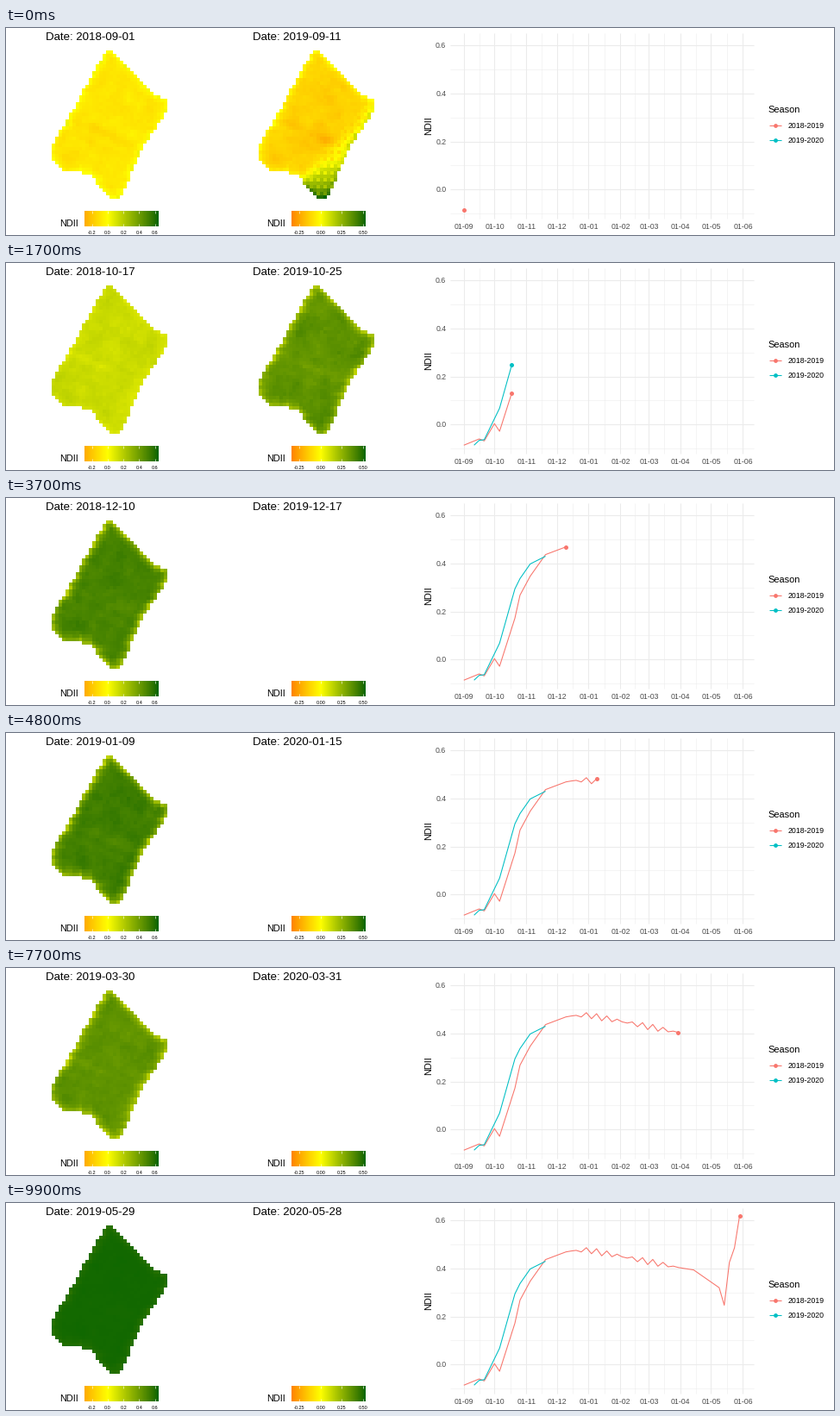
Write a matplotlib script that moves like this. It is 960 px wide and 240 px high and loops after 10000 ms.

```python
import numpy as np
import matplotlib.pyplot as plt
from matplotlib.animation import FuncAnimation
from matplotlib.colors import ListedColormap
from matplotlib.path import Path

W, H, DPI = 960, 240, 72
FRAMES, INTERVAL = 100, 100
RED, TEAL, GREY = "#F8766D", "#00BFC4", "#4D4D4D"
ROWS, COLS = 43, 34
LEFT, RIGHT, TOP, BOTTOM = 53, 187, 26, 198

plt.rcParams["font.family"] = "Liberation Sans"
rng = np.random.default_rng(11)


# ---------- seasonal curves ----------
def plateau_season():
    """Steep rise, wavering plateau every five days, dip and late jump."""
    keys = [(0, -.086), (15, -.06), (20, -.068), (30, .004), (35, -.028),
            (50, .172), (55, .268), (65, .347), (80, .437), (100, .469),
            (120, .477), (155, .45), (210, .404), (225, .394), (250, .32),
            (255, .247), (260, .425), (265, .486), (270, .619)]
    key_days, key_vals = np.array(keys).T
    days = np.union1d(key_days, np.arange(105, 210, 5))
    waver = .013 * np.sin(np.pi * (days - 107) / 50) * np.cos(np.pi * days / 5)
    waver[(days <= 100) | (days >= 210)] = 0
    return days, np.interp(days, key_days, key_vals) + waver


def short_season():
    return np.array([(10, -.086), (15, -.066), (20, -.063), (35, .068),
                     (50, .294), (55, .337), (65, .398), (80, .43)]).T


class Series:
    """Dated values; each date snaps to the nearest animation step."""

    def __init__(self, curve, start, span):
        self.days, self.values = curve
        self.steps = np.round((self.days - start) * (FRAMES - 1) / span)

    def alive(self, i):
        return self.steps[0] <= i <= self.steps[-1]

    def at(self, i):
        return (np.interp(i, self.steps, self.days),
                np.interp(i, self.steps, self.values))


# ---------- diverging colour ramp, blended in CIE Lab ----------
M = np.array([[.4124, .3576, .1805], [.2126, .7152, .0722],
              [.0193, .1192, .9505]])
WHITE = M.sum(axis=1)


def to_lab(rgb):
    c = np.array(rgb, float)
    lin = np.where(c <= .04045, c / 12.92, ((c + .055) / 1.055) ** 2.4)
    t = M @ lin / WHITE
    x, y, z = np.where(t > .008856, np.cbrt(t), 7.787 * t + 16 / 116)
    return np.array([116 * y - 16, 500 * (x - y), 200 * (y - z)])


def to_rgb(lab):
    y = (lab[:, 0] + 16) / 116
    f = np.stack([y + lab[:, 1] / 500, y, y - lab[:, 2] / 200], axis=1)
    xyz = np.where(f > .2069, f ** 3, (f - 16 / 116) / 7.787) * WHITE
    lin = np.clip(xyz @ np.linalg.inv(M).T, 0, 1)
    return np.clip(np.where(lin <= .0031308, 12.92 * lin,
                            1.055 * lin ** (1 / 2.4) - .055), 0, 1)


def ramp(n=256):
    low, mid, high = map(to_lab, [(1, 0, 0), (1, 1, 0), (0, 100 / 255, 0)])
    t = np.linspace(0, 1, n)[:, None]
    lab = np.vstack([low + (mid - low) * t, mid + (high - mid) * t])
    return ListedColormap(to_rgb(lab))


CMAP = ramp()


# ---------- field geometry and textures ----------
def neighbours(a):
    p = np.pad(a, 1, mode="edge")
    return p[:-2, 1:-1], p[2:, 1:-1], p[1:-1, :-2], p[1:-1, 2:]


def noise(passes):
    n = rng.standard_normal((ROWS, COLS))
    for _ in range(passes):
        n = (sum(neighbours(n)) + 2 * n) / 6
    return n / n.std()


def texture():
    return .8 * noise(4) + .35 * noise(0)


def bell(x, width):
    return np.exp(-(x / width) ** 2)


def rim_weight(mask):
    """Strong in the border cells, fading with each ring inwards."""
    m, depth = np.pad(mask, 1), 0
    for _ in range(4):
        depth = depth + m
        m = m & np.logical_and.reduce(neighbours(m))
    depth = depth[1:-1, 1:-1]
    rim = .9 * .42 ** (depth - 1.) * (1 + .22 * noise(2))
    return np.clip(rim, 0, 1.2) - rim[mask].mean()


gx = LEFT + (np.arange(COLS) + .5) * (RIGHT - LEFT) / COLS
gy = TOP + (np.arange(ROWS) + .5) * (BOTTOM - TOP) / ROWS
X, Y = np.meshgrid(gx, gy)
outline = Path([(117, 25), (121, 25.5), (175, 79), (188, 82), (188, 94),
                (162, 133), (148, 161), (132.5, 199), (123.5, 199),
                (96, 169), (66, 164.5), (52, 151), (52, 139)])
inside = outline.contains_points(np.c_[X.ravel(), Y.ravel()]).reshape(X.shape)

rim = rim_weight(inside)
tilt = Y - 105 - .42 * (X - 75)
ridge = (bell(tilt, 5) + .5 * bell(tilt - 17, 4)) * bell(X - 108, 48)
core = bell(X - 117, 14) * bell(Y - 122, 32)

# Freshly wet corner with a checked texture
reach = np.clip((Y - 170 + 1.09 * (X - 100)) / 22, 0, 1)
low = np.clip((Y - 148) / 50, 0, 1)
row, col = np.indices(X.shape)
check = np.where((row % 2 == 0) | (col % 2 == 0), .3, -1)
wet = ((.1 + .07 * check + .45 * low ** 1.3) * reach
       - .08 * bell(X - 130, 12) * bell(Y - 130, 8))
wet -= wet[inside].mean()


class Field:
    def __init__(self, ax, dx, start, span, series, lo, hi, ticks, wetness=0):
        self.start, self.span = np.datetime64(start), span
        self.series, self.lo, self.hi = series, lo, hi
        self.wetness = wetness
        self.tex = texture(), texture()
        lim = max(-lo, hi)
        style = dict(cmap=CMAP, vmin=-lim, vmax=lim, aspect="auto",
                     interpolation="nearest", zorder=2)
        self.img = ax.imshow(np.ma.masked_all(X.shape),
                             extent=(LEFT + dx, RIGHT + dx, BOTTOM, TOP), **style)
        self.title = ax.text(45.9 + dx, 13.8, "", size=13.2)

        x0, x1, y0, y1 = 91 + dx, 177 + dx, 212, 230
        ax.imshow(np.linspace(lo, hi, 300)[None], extent=(x0, x1, y1, y0), **style)
        ax.text(62.3 + dx, 230, "NDII", size=11)
        for label in ticks:
            x = x0 + (float(label) - lo) / (hi - lo) * (x1 - x0)
            ax.vlines([x, x], [y0, y1 - 3.4], [y0 + 3.4, y1], colors="white",
                      lw=.6, zorder=3)
            ax.text(x, 239, label, size=5.5, ha="center")

    def values(self, i):
        day, mean = self.series.at(i)
        phase = day / 25
        tex = np.cos(phase) * self.tex[0] + np.sin(phase) * self.tex[1]
        calm = np.interp(day, [255, 270], [1, .1])
        v = mean + calm * (.016 * tex - .03 * ridge + .008)
        v = v + calm * rim * (.05 - .68 * mean)
        v = v - .06 * core * bell(day - 32, 12)
        v = v + self.wetness * wet * np.exp((10 - day) / 16)
        return np.clip(v, self.lo, self.hi)

    def update(self, i):
        day = i * self.span // (FRAMES - 1)
        self.title.set_text(f"Date: {self.start + day}")
        hidden = ~inside if self.series.alive(i) else np.ones_like(inside)
        self.img.set_data(np.ma.array(self.values(i), mask=hidden))


# ---------- chart ----------
def px(day):
    return 530.8 + 1.1842 * np.asarray(day)


def py(v):
    return 187.3 - 278.5 * np.asarray(v)


def draw_chart(ax):
    x0, x1, y0, y1 = 515, 866.7, 5.5, 221
    months = np.arange("2018-09", "2019-07", dtype="datetime64[M]")
    firsts = months.astype("datetime64[D]")
    days = (firsts - firsts[0]).astype(int)
    levels = np.arange(0, .7, .2)
    grid = dict(colors="#EBEBEB", zorder=1)
    ax.vlines(px((days[1:] + days[:-1]) / 2), y0, y1, lw=.53, **grid)
    ax.hlines(py(levels - .1), x0, x1, lw=.53, **grid)
    ax.vlines(px(days), y0, y1, lw=1.07, **grid)
    ax.hlines(py(levels), x0, x1, lw=1.07, **grid)
    for month, day in zip(months, days):
        ax.text(px(day) + .4, 233, f"01-{str(month)[-2:]}", size=8.8,
                ha="center", color=GREY)
    for v in levels:
        ax.text(510.3, py(v) + 3.1, f"{v:.1f}", size=8.8, ha="right", color=GREY)
    ax.text(490, 113.5, "NDII", size=11, rotation=90, ha="center", va="center")

    ax.text(883, 98, "Season", size=11)
    for y, name, color in ((112.8, "2018-2019", RED), (129.8, "2019-2020", TEAL)):
        ax.plot([885, 899.4], [y, y], color=color, lw=1.07, solid_capstyle="butt")
        ax.plot(892.3, y, "o", color=color, ms=4.8, mew=0)
        ax.text(906.3, y + 3.2, name, size=8.8)


class Trace:
    def __init__(self, ax, series, color):
        self.series = series
        self.line, = ax.plot([], [], color=color, lw=1.07, zorder=4,
                             solid_capstyle="butt", solid_joinstyle="round")
        self.dot, = ax.plot([], [], "o", color=color, ms=5, mew=0, zorder=5)

    def update(self, i):
        s = self.series
        past = s.steps <= i
        d, v = s.days[past], s.values[past]
        head = ([], [])
        if s.alive(i):
            day, val = s.at(i)
            d, v = np.append(d, day), np.append(v, val)
            head = ([px(day)], [py(val)])
        self.line.set_data(px(d), py(v))
        self.dot.set_data(*head)


fig = plt.figure(figsize=(W / DPI, H / DPI), dpi=DPI, facecolor="white")
ax = fig.add_axes([0, 0, 1, 1])

first, second = plateau_season(), short_season()
parts = [
    Field(ax, 0, "2018-09-01", 270, Series(first, 0, 270), -.293, .647,
          ["-0.2", "0.0", "0.2", "0.4", "0.6"]),
    Field(ax, 240, "2019-09-11", 260, Series(second, 10, 260), -.345, .532,
          ["-0.25", "0.00", "0.25", "0.50"], wetness=1),
    Trace(ax, Series(first, 0, 270), RED),
    Trace(ax, Series(second, 0, 270), TEAL),
]
draw_chart(ax)
ax.set(xlim=(0, W), ylim=(H, 0))
ax.axis("off")


def update(i):
    for part in parts:
        part.update(i)
    return []


anim = FuncAnimation(fig, update, frames=FRAMES, interval=INTERVAL,
                     repeat=True, repeat_delay=0, blit=False)
plt.show()
```
